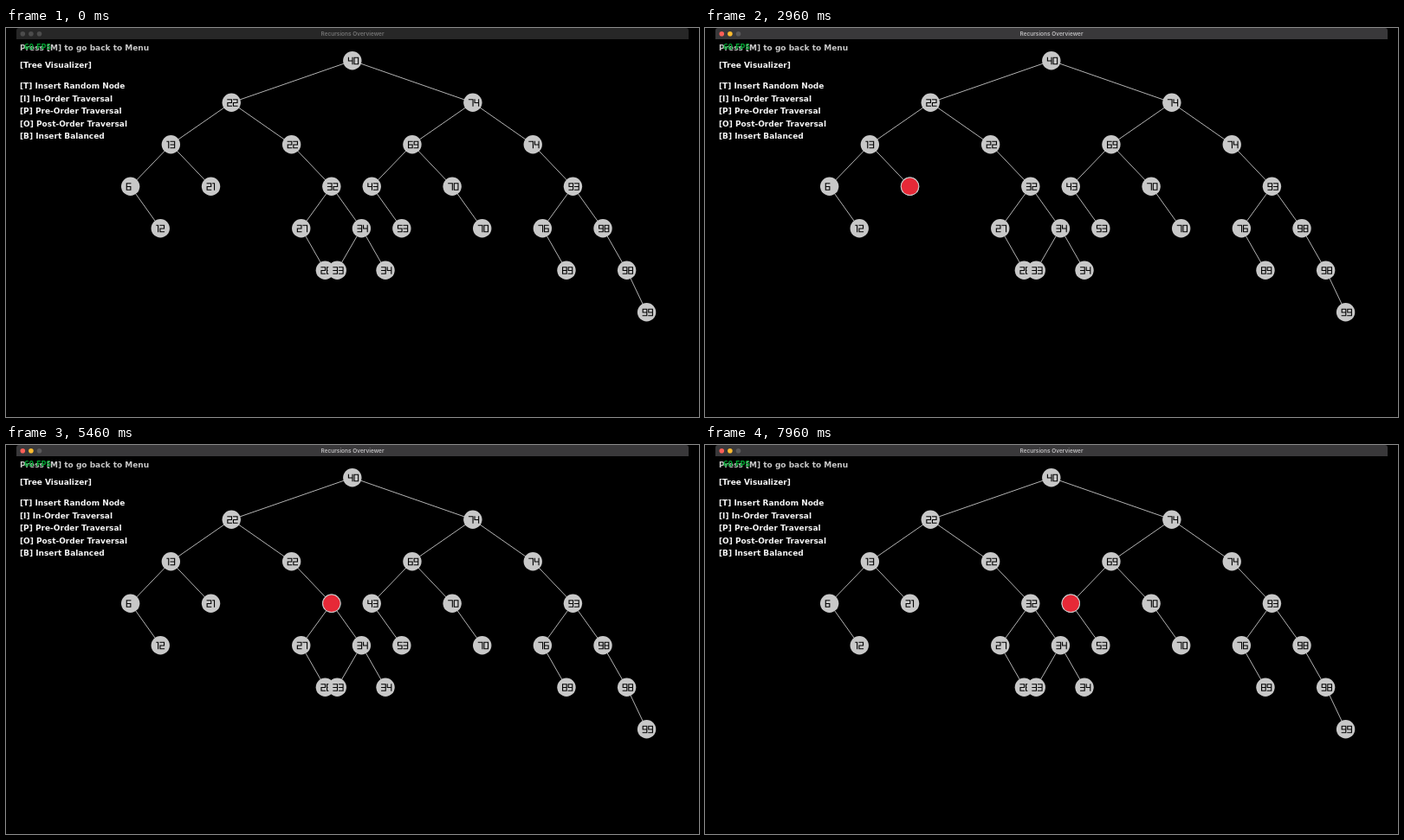
An HTML page with a canvas that plays this animation: 800x450 px, repeating every 8000 ms.

```html
<!DOCTYPE html>
<html lang="en">
<head>
<meta charset="utf-8">
<title>Tree traversal</title>
<style>
  html, body { margin: 0; width: 100%; height: 100%; overflow: hidden; background: #000; }
  canvas { display: block; width: 800px; height: 450px; }
</style>
</head>
<body>
<canvas id="stage" width="800" height="450"></canvas>
<script>
const ctx = document.getElementById('stage').getContext('2d');
const LOOP = 8000;
const FOCUS_AT = 630;
const VISITS = [1420, 1880, 2420, 2920, 3420, 3960, 4420, 4880, 5420, 5960, 6420, 6960, 7420, 7960];
const VALUES = [40, 22, 74, 13, 22, 69, 74, 6, 21, 32, 43, 70, 93, 12, 27, 34, 53, 70, 76, 98, 28, 33, 34, 89, 98, 99];
const ROOT_X = 399.8, ROOT_Y = 37.8;
const SPREAD = 139.3, DRIFT = 0.25;
const ROW = 48.5;
const RADIUS = 10.7;
const GREY = '#c8c8c8';
const WHITE = '#f5f5f5';
const RED = '#e62937';
const GREEN = '#009e2f';
const LABEL_FONT = 'bold 9px "DejaVu Sans", sans-serif';
const MENU = [
  '[T] Insert Random Node',
  '[I] In-Order Traversal',
  '[P] Pre-Order Traversal',
  '[O] Post-Order Traversal',
  '[B] Insert Balanced'
];

// Binary search tree; equal values go to the right, the spread shrinks with depth.
const nodes = [];
function insert(value) {
  const node = { value, x: ROOT_X, y: ROOT_Y, depth: 0 };
  let parent = nodes[0];
  while (parent) {
    const side = value < parent.value ? 'left' : 'right';
    if (parent[side]) {
      parent = parent[side];
      continue;
    }
    node.depth = parent.depth + 1;
    const shift = SPREAD / node.depth;
    node.x = parent.x + (side === 'left' ? -shift : shift) - DRIFT;
    node.y = parent.y + ROW;
    node.parent = parent;
    parent[side] = node;
    break;
  }
  nodes.push(node);
}
VALUES.forEach(insert);

function inOrder(node) {
  return node ? [...inOrder(node.left), node, ...inOrder(node.right)] : [];
}
const order = inOrder(nodes[0]);

function disc(x, y, r, color) {
  ctx.fillStyle = color;
  ctx.beginPath();
  ctx.arc(x, y, r, 0, Math.PI * 2);
  ctx.fill();
}

function label(text, x, y, color, font = LABEL_FONT) {
  ctx.font = font;
  ctx.fillStyle = color;
  ctx.fillText(text, x, y);
}

// Square digits: strokes a to g, clockwise from the top, g in the middle.
const DIGITS = ['abcdef', '', 'abged', 'abgcd', 'fgbc', 'afgcd', 'afgcde', 'abc', 'abcdefg', 'abcdfg'];
const W = 4.6, H = 3.7;
const STROKES = {
  a: [0, -H, W, -H], b: [W, -H, W, 0], c: [W, 0, W, H], d: [0, H, W, H],
  e: [0, 0, 0, H], f: [0, -H, 0, 0], g: [0, 0, W, 0]
};

function number(value, x, y) {
  ctx.strokeStyle = '#000';
  ctx.lineWidth = 1.1;
  ctx.lineCap = 'square';
  ctx.beginPath();
  for (const digit of String(value)) {
    if (digit === '1') {
      ctx.moveTo(x, y - H);
      ctx.lineTo(x + 1.8, y - H);
      ctx.lineTo(x + 1.8, y + H);
      x += 4.1;
      continue;
    }
    for (const s of DIGITS[digit]) {
      const [x1, y1, x2, y2] = STROKES[s];
      ctx.moveTo(x + x1, y + y1);
      ctx.lineTo(x + x2, y + y2);
    }
    x += W + 2;
  }
  ctx.stroke();
}

function drawWindow(active) {
  ctx.fillStyle = active ? '#39383a' : '#272727';
  ctx.beginPath();
  ctx.roundRect(12, 0, 776, 13, [3, 3, 0, 0]);
  ctx.fill();
  const lights = active ? ['#fe5f57', '#febc2e', '#5a595b'] : ['#4c4c4c', '#4c4c4c', '#4c4c4c'];
  lights.forEach((color, i) => disc(19.3 + i * 9.6, 6.7, 2.8, color));
  ctx.textAlign = 'center';
  label('Recursions Overviewer', 400, 9, active ? '#bebdbf' : '#737373', '600 6.5px Inter, sans-serif');
  ctx.textAlign = 'left';
}

function drawMenu() {
  label('Press [M] to go back to Menu', 16, 26.3, GREY);
  label('60 FPS', 21, 25, GREEN, 'bold 8px "DejaVu Sans", sans-serif');
  label('[Tree Visualizer]', 16, 45.8, WHITE);
  MENU.forEach((text, i) => label(text, 16, 70 + i * 14.6, WHITE));
}

function drawTree(current) {
  ctx.strokeStyle = GREY;
  ctx.lineWidth = 0.9;
  ctx.beginPath();
  for (const { parent, x, y } of nodes) {
    if (!parent) continue;
    ctx.moveTo(parent.x, parent.y);
    ctx.lineTo(x, y);
  }
  ctx.stroke();
  for (const { x, y, value } of nodes) {
    disc(x, y, RADIUS, GREY);
    number(value, x - 4.4, y + 0.2);
  }
  if (current) {
    disc(current.x, current.y, RADIUS, GREY);
    disc(current.x, current.y, 9.7, RED);
  }
}

function draw(t) {
  ctx.fillStyle = '#000';
  ctx.fillRect(0, 0, 800, 450);
  drawWindow(t >= FOCUS_AT);
  drawTree(order[VISITS.filter(at => t >= at).length - 1]);
  drawMenu();
}

const start = performance.now();
function tick() {
  draw((performance.now() - start) % LOOP);
  requestAnimationFrame(tick);
}
tick();
</script>
</body>
</html>
```
